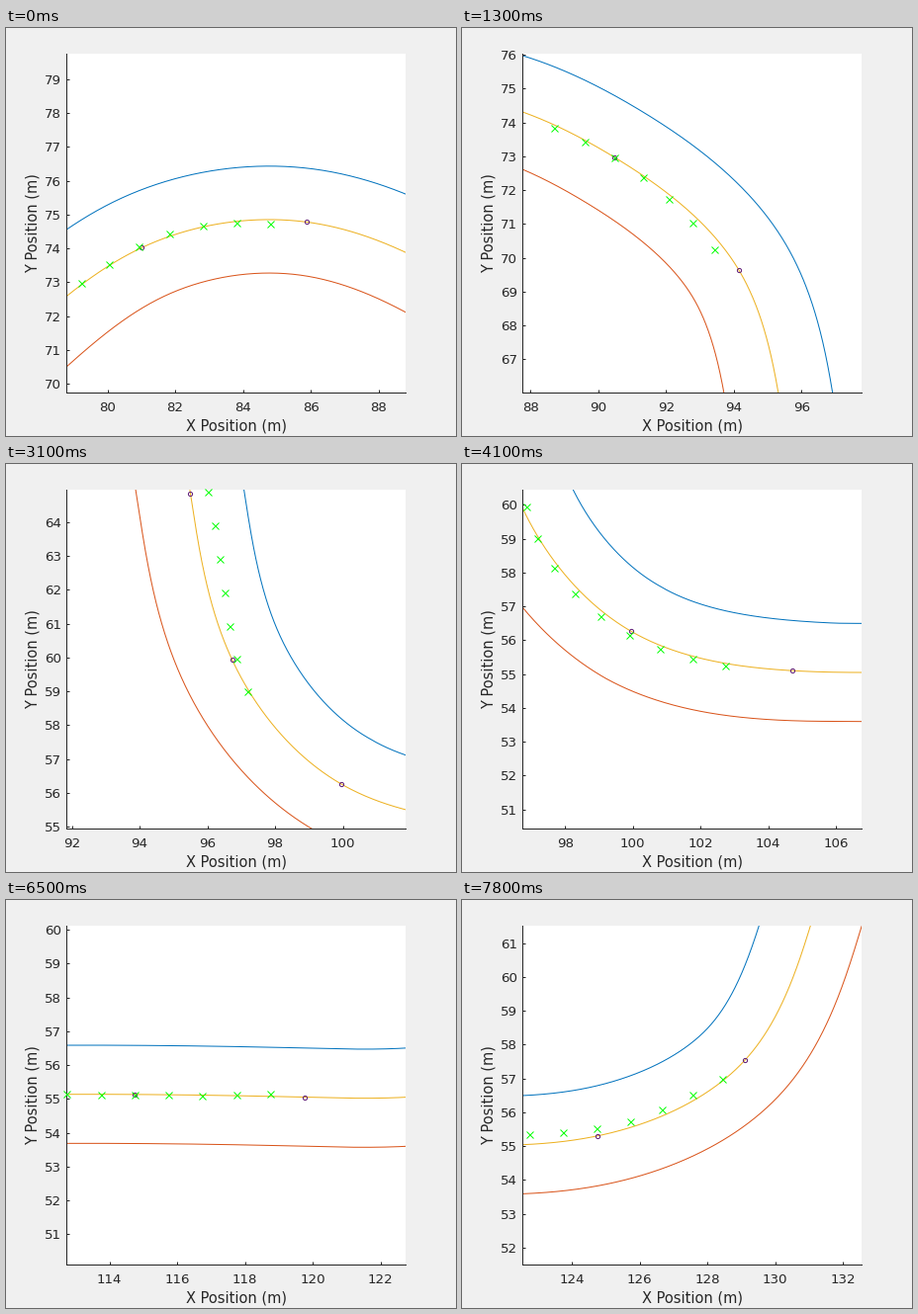
Write a matplotlib script that moves like this. It is 455 px wide and 413 px high and loops after 8000 ms.

```python
import numpy as np
import matplotlib.pyplot as plt
from matplotlib.animation import FuncAnimation
from matplotlib.patches import Polygon
from matplotlib.ticker import MultipleLocator

W, H, DPI = 455, 413, 100
PX = 72 / DPI
INK = "#262626"
HALF_VIEW = 5
LEAD = 6        # markers already behind the vehicle at the start
STEPS = 55      # metres driven in one loop
plt.rcParams["font.family"] = "DejaVu Sans"


def spline(t, p, u):
    """Natural cubic spline through points p at parameters t, sampled at u."""
    n, h = len(t), np.diff(t)
    slope = np.diff(p, axis=0) / h[:, None]
    A, b = np.eye(n), np.zeros_like(p)
    for i in range(1, n - 1):
        A[i, i - 1:i + 2] = h[i - 1], 2 * (h[i - 1] + h[i]), h[i]
        b[i] = 6 * (slope[i] - slope[i - 1])
    m = np.linalg.solve(A, b)
    k = np.clip(np.searchsorted(t, u, side="right") - 1, 0, n - 2)
    hk, l, r = h[k][:, None], (u - t[k])[:, None], (t[k + 1] - u)[:, None]
    return ((m[k] * r**3 + m[k + 1] * l**3) / (6 * hk)
            + (p[k] / hk - m[k] * hk / 6) * r
            + (p[k + 1] / hk - m[k + 1] * hk / 6) * l)


def arc(p):
    return np.r_[0, np.cumsum(np.hypot(*np.diff(p, axis=0).T))]


def curve(points, n=1500):
    """n points, evenly spaced along a smooth curve through the given ones."""
    t = arc(points)
    fine = spline(t, points, np.linspace(0, t[-1], 4000))
    s = arc(fine)
    even = np.linspace(0, s[-1], n)
    return np.column_stack([np.interp(even, s, c) for c in fine.T])


# Road: a curve through waypoints 5 m apart, with edges offset along its normal
waypoints = np.array([
    (77.05, 71.05), (81.01, 74.02), (85.87, 74.78), (90.48, 72.97),
    (94.15, 69.64), (95.5, 64.85), (96.73, 59.94), (99.94, 56.27),
    (104.72, 55.10), (109.75, 55.10), (114.75, 55.13), (119.75, 55.05),
    (124.76, 55.30), (129.11, 57.54), (131.22, 62.1)])
center = curve(waypoints)
tangent = np.gradient(center, axis=0)
tangent /= np.hypot(*tangent.T)[:, None]
half_width = np.interp(center[:, 0], [100, 106], [1.58, 1.45])
offset = tangent[:, ::-1] * (-1, 1) * half_width[:, None]

# Vehicle: one marker per metre driven
path = curve(np.array([
    (79.23, 72.97), (81.85, 74.46), (84.82, 74.72), (88.70, 73.84),
    (91.33, 72.38), (93.42, 70.25), (96.00, 64.90), (96.50, 61.96),
    (97.17, 59.04), (99.04, 56.71), (102.71, 55.25), (106.73, 55.09),
    (111.73, 55.15), (118.74, 55.14), (122.75, 55.35), (125.69, 55.73),
    (128.43, 56.99)]), LEAD + STEPS + 1)

# Metres driven at key ticks; the drive halts briefly where they repeat
ticks = [0, 4, 6, 13, 31, 36, 38, 41, 48, 50, 54, 62, 64, 78]
metres = [0, 4, 4, 10, 22, 26, 26, 29, 33, 33, 38, 44, 44, 55]

fig = plt.figure(figsize=(W / DPI, H / DPI), dpi=DPI, facecolor="#f0f0f0")
ax = fig.add_axes([61.5 / W, 44.5 / H, 342.5 / W, 342.5 / H],
                  facecolor="white")
for side in ("top", "right"):
    ax.spines[side].set_visible(False)
for side in ("left", "bottom"):
    ax.spines[side].set(linewidth=PX, color=INK)
ax.xaxis.set_major_locator(MultipleLocator(2))
ax.yaxis.set_major_locator(MultipleLocator(1))
ax.tick_params(direction="in", length=3 * PX, width=PX, color=INK,
               labelcolor=INK, labelsize=13.33 * PX)
ax.tick_params(axis="x", pad=9.5 * PX)
ax.tick_params(axis="y", pad=5.5 * PX)

label = dict(fontsize=14.67 * PX, color=INK, ha="center", va="center")
fig.text(233.3 / W, 1 - 403.5 / H, "X Position (m)", **label)
fig.text(27.5 / W, 1 - 198 / H, "Y Position (m)", rotation=90, **label)

for line, color in ((center + offset, "#0072BD"), (center - offset, "#D95319"),
                    (center, "#EDB120")):
    ax.plot(*line.T, color=color, lw=PX)
rings, = ax.plot([], [], "o", ms=4.2 * PX, mfc="none", mec="#5f1c78",
                 mew=PX, clip_on=False, zorder=4)
trail, = ax.plot([], [], "x", ms=7 * PX, mec="#00ff00", mew=PX,
                 clip_on=False, zorder=5)

ARROW = np.array([(0, 0), (0, 16.5), (3.8, 13), (6.4, 19), (9.2, 17.8),
                  (6.6, 12), (11.6, 12)])
cursor = Polygon(ARROW, closed=True, fc="white", ec="black", lw=1.2 * PX,
                 transform=None, zorder=10, visible=False)
fig.add_artist(cursor)


def inside(points, middle, reach):
    return points[np.abs(points - middle).max(axis=1) <= reach].T


def draw(i):
    now = LEAD + int(np.interp(i, ticks, metres) + 0.3)
    middle = path[now - 1]
    ax.set_xlim(middle[0] - HALF_VIEW, middle[0] + HALF_VIEW)
    ax.set_ylim(middle[1] - HALF_VIEW, middle[1] + HALF_VIEW)
    trail.set_data(*inside(path[:now + 1], middle, HALF_VIEW + 0.01))
    rings.set_data(*inside(waypoints, middle, HALF_VIEW - 0.02))

    # The pointer dips in from the top edge and leaves again
    away = abs(i - 54.5)
    cursor.set_visible(away <= 2.5)
    tip = (358.5, 168 * (2.5 - away) / 2)
    cursor.set_xy((ARROW + tip) * (1, -1) + (0, H))
    return trail, rings, cursor


anim = FuncAnimation(fig, draw, frames=80, interval=100, repeat=True,
                     repeat_delay=0, blit=False)
plt.show()
```
